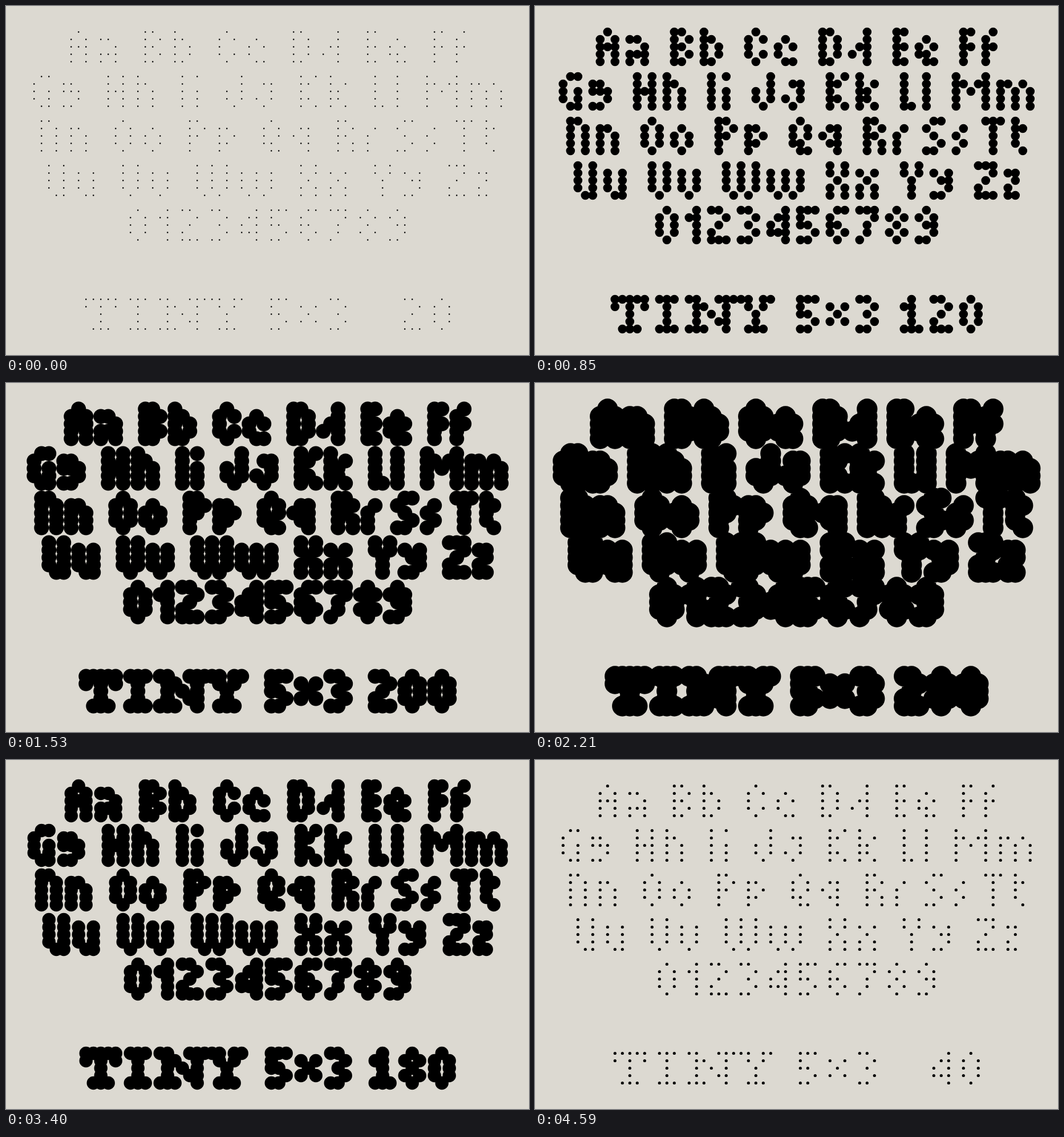
Recreate the animation shown at these times as an HTML page with a canvas. Size 917 px wide and 611 px high, loop 4.76 s.

```html
<!DOCTYPE html>
<html lang="en">
<head>
<meta charset="utf-8">
<title>Dot typeface</title>
<style>
  html, body { margin: 0; width: 100%; height: 100%; overflow: hidden; background: #dcd9d1; }
  canvas { display: block; }
</style>
</head>
<body>
<canvas id="stage" width="917" height="611"></canvas>
<script>
const PITCH = 13, LEFT = 49.25, TOP = 45.5;
const STEP_MS = 170, STEPS = 28;
const PAPER = '#dcd9d1', INK = '#000';

// Each glyph is a list of rows, aligned to the baseline.
const glyphs = {
  A: '.#. #.# ### #.# #.#',  a: '##. ..# ### #.#',
  B: '##. #.# ##. #.# ##.',  b: '#.. ##. #.# #.# ##.',
  C: '.#. #.# #.. #.# .#.',  c: '.#. #.# #.. .##',
  D: '##. #.# #.# #.# ##.',  d: '..# ..# .## #.# ..#',
  E: '## #. ## #. ##',       e: '.#. #.# ##. .##',
  F: '## #. ## #. #.',       f: '.# #. ## #. #.',
  G: '.## #.. #.# #.# .##',  g: '##. ### ..# ##.',
  H: '#.# #.# ### #.# #.#',  h: '#.. ##. #.# #.# #.#',
  I: '# # # # #',            i: '# . # # #',
  J: '..# ..# #.# #.# .#.',  j: '.## ..# #.# .#.',
  K: '#.# ##. #.. ##. #.#',  k: '#.. #.# ##. ##. #.#',
  L: '#. #. #. #. ##',       l: '# # # # #',
  M: '#...# ##.## #.#.# #...# #...#',
  m: '##.#. #.#.# #.#.# #.#.#',
  N: '##. #.# #.# #.# #.#',  n: '##. #.# #.# #.#',
  O: '.#. #.# #.# #.# .#.',  o: '.#. #.# #.# .#.',
  P: '##. #.# ##. #.. #..',  p: '##. #.# ##. #..',
  Q: '.#. #.# #.# ##. .##',  q: '.## #.# .## ..#',
  R: '##. #.# ##. #.# #.#',  r: '.# #. #. #.',
  S: '.## #.. .#. ..# ##.',  s: '.# #. .# #.',
  T: '### .#. .#. .#. .#.',  t: '#. ## #. #. .#',
  U: '#.# #.# #.# #.# .##',  u: '#.# #.# #.# .##',
  V: '#.# #.# #.# #.# .#.',  v: '#.# #.# #.# .#.',
  W: '#.#.# #.#.# #.#.# #.#.# .#.#.',
  w: '#.#.# #.#.# #.#.# .#.#.',
  X: '#.# #.# .#. #.# #.#',  x: '#.# .#. #.# #.#',
  Y: '#.# #.# .#. .#. .#.',  y: '#.# .## ..# ##.',
  Z: '### ..# .#. #.. ###',  z: '## .# #. ##',
  0: '.#. #.# #.# #.# .#.',  1: '.# ## .# .# .#',
  2: '##. ..# .#. #.. ###',  3: '##. ..# .#. ..# ##.',
  4: '..# .## #.# ### ..#',  5: '### #.. ##. ..# ##.',
  6: '.## #.. ##. #.# .#.',  7: '### ..# .#. .#. #..',
  8: '.#. #.# .#. #.# .#.',  9: '.#. #.# .## ..# ##.',
  '×': '#.# .#. #.# ...'
};

// Slab forms used in the title line.
const slabs = {
  T: '##### #.#.# ..#.. ..#.. .###.',
  I: '### .#. .#. .#. ###',
  N: '##..### .##..#. .#.#.#. .#..##. ###..#.',
  Y: '##.## .#.#. ..#.. ..#.. .###.',
  1: '.#. ##. .#. .#. ###'
};

const TITLE_ROW = 36;

function glyphDots(pattern, col, row) {
  const rows = pattern.split(' ');
  const first = row + 5 - rows.length;
  return rows.flatMap((cells, r) =>
    [...cells].flatMap((cell, c) => cell === '#' ? [[col + c, first + r]] : []));
}

// A space widens the letter gap by two columns, "|" by one.
function lineDots(text, col, row) {
  const dots = [];
  for (const ch of text) {
    if (ch === ' ') col += 2;
    else if (ch === '|') col += 1;
    else {
      dots.push(...glyphDots(glyphs[ch], col, row));
      col += glyphs[ch].indexOf(' ') + 1;
    }
  }
  return dots;
}

const fixedDots = [
  ...lineDots('Aa Bb Cc Dd Ee Ff', 5, 0),
  ...lineDots('Gg Hh Ii Jj Kk Ll Mm', 0, 6),
  ...lineDots('Nn Oo Pp Qq Rr|Ss|Tt', 1, 12),
  ...lineDots('Uu Vv Ww Xx Yy Zz', 2, 18),
  ...lineDots('0123456789', 13, 24),
  ...glyphDots(slabs.T, 7, TITLE_ROW),
  ...glyphDots(slabs.I, 13, TITLE_ROW),
  ...glyphDots(slabs.N, 17, TITLE_ROW),
  ...glyphDots(slabs.Y, 24, TITLE_ROW),
  ...lineDots('5×3', 32, TITLE_ROW)
];

function numberDots(value) {
  return [...String(value).padStart(3)].flatMap((ch, i) =>
    ch === ' ' ? [] : glyphDots(slabs[ch] || glyphs[ch], 46 + 4 * i, TITLE_ROW));
}

const ctx = document.getElementById('stage').getContext('2d');

function draw(weight) {
  const radius = PITCH * weight / 200;
  ctx.fillStyle = PAPER;
  ctx.fillRect(0, 0, 917, 611);
  ctx.fillStyle = INK;
  ctx.beginPath();
  for (const [col, row] of [...fixedDots, ...numberDots(weight)]) {
    const x = LEFT + col * PITCH, y = TOP + row * PITCH;
    ctx.moveTo(x + radius, y);
    ctx.arc(x, y, radius, 0, 2 * Math.PI);
  }
  ctx.fill();
}

const start = performance.now();

function tick() {
  const elapsed = Math.max(0, performance.now() - start);
  const step = Math.floor(elapsed / STEP_MS) % STEPS;
  draw(20 * (1 + Math.min(step, STEPS - step)));
  requestAnimationFrame(tick);
}
tick();
</script>
</body>
</html>
```
